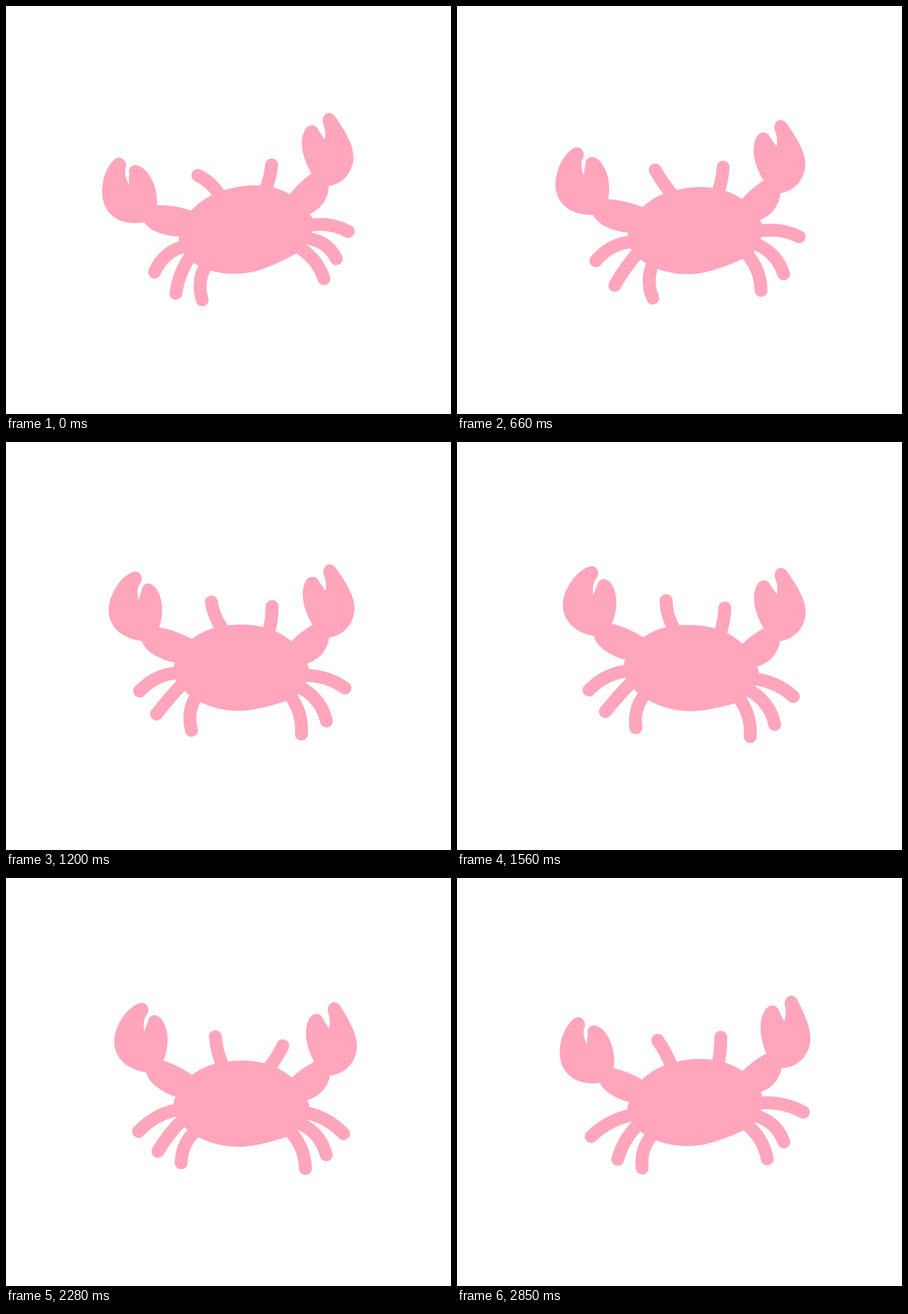
Recreate the animation shown at these times as an HTML page with a canvas. Size 759 by 697 pixels, loop 2.88 s.

```html
<!DOCTYPE html>
<html lang="en">
<head>
<meta charset="utf-8">
<title>Crab</title>
<style>
  html, body { margin: 0; height: 100%; overflow: hidden; background: #fff; }
  canvas { display: block; }
</style>
</head>
<body>
<canvas id="stage" width="759" height="697"></canvas>
<script>
const ctx = document.getElementById('stage').getContext('2d');
const LOOP = 2880, STEP = 30;
const RAD = Math.PI / 180;

// Bézier curve of any degree, used as the easing of one value over the loop.
function ease(points, t) {
  const s = t / (LOOP - STEP);
  let p = points;
  while (p.length > 1) p = p.slice(1).map((v, i) => p[i] + (v - p[i]) * s);
  return p[0];
}

// The body swings about one pivot and carries all the joints.
const pivot = [384, 347];
const tilt = t => -6.8 * RAD * (1 - Math.cos(Math.PI * (t - 1740) / 1800));
const body = new Path2D('M285 376Q295 350 318 333C340 318 365 312 397 312.5C422 313 443 318 461 327' +
  'Q484 339 498 358Q509 374 515 394Q513 414 500 433Q488 442 473 447Q430 459 398 460' +
  'Q357 459 326 441Q305 429 293 412Q284 398 283 388Z');

function onBody([x, y], t) {
  const c = Math.cos(tilt(t)), s = Math.sin(tilt(t));
  const dx = x - pivot[0], dy = y - pivot[1];
  return [pivot[0] + dx * c - dy * s, pivot[1] + dx * s + dy * c];
}

// A bone turns about its joint: swing in degrees, reach in pixels.
function bone({ joint, swing, reach }, t) {
  const [x, y] = onBody(joint, t);
  const angle = ease(swing, t) * RAD, length = ease(reach, t);
  const dx = length * Math.cos(angle), dy = length * Math.sin(angle);
  return { x, y, dx, dy, angle, length };
}

// Fills a path after turning it about `from` and moving that point to `to`.
function place(path, from, to, angle, scale = 1) {
  ctx.save();
  ctx.translate(...to);
  ctx.rotate(angle);
  ctx.scale(scale, scale);
  ctx.translate(-from[0], -from[1]);
  ctx.fill(path);
  ctx.restore();
}

// Legs and antennae are round strokes with a sideways bend.
function drawLimb(limb, t) {
  const { x, y, dx, dy, length } = bone(limb, t);
  const k = ease(limb.bend, t) / length;
  ctx.beginPath();
  ctx.moveTo(x, y);
  ctx.quadraticCurveTo(x + dx / 2 - dy * k, y + dy / 2 + dx * k, x + dx, y + dy);
  ctx.stroke();
}

// An upper arm follows its bone, the claw turns at the elbow.
function drawArm(arm, t) {
  const { x, y, dx, dy, angle, length } = bone(arm, t);
  const rx = arm.elbow[0] - arm.joint[0], ry = arm.elbow[1] - arm.joint[1];
  place(arm.upper, arm.joint, [x, y], angle - Math.atan2(ry, rx), length / Math.hypot(rx, ry));
  place(arm.claw, arm.elbow, [x + dx, y + dy], ease(arm.turn, t) * RAD);
}

const limbs = [
  // left legs
  { joint: [300, 390], swing: [142, 172, 147, 154], reach: [75, 88], bend: [20, 14] },
  { joint: [300, 407], swing: [112, 137, 136, 121], reach: [71], bend: [9, -6, 10] },
  { joint: [325, 425], swing: [99, 73, 138, 110], reach: [66], bend: [16] },
  // right legs
  { joint: [500, 405], swing: [7, -12, 60, 10], reach: [74, 84], bend: [-14] },
  { joint: [503, 428], swing: [37, 58, 61, 45], reach: [56, 75, 66, 61], bend: [-14] },
  { joint: [478, 435], swing: [50, 84, 74, 58], reach: [72], bend: [-14] },
  // antennae
  { joint: [370, 318], swing: [222, 237, 281, 242], reach: [49], bend: [7, -18, 3] },
  { joint: [449, 328], swing: [-76, -81, -60, -150, 10, -84], reach: [43, 46], bend: [3] }
];

const arms = [
  {
    joint: [310, 355], elbow: [247, 318],
    swing: [196, 196, 225, 210], reach: [71, 76, 66], turn: [-22, -14, 24, -19],
    upper: new Path2D('M345 345L318 333Q292 316 263 309L240 300L232 328Q234 343 252 356Q268 367 287 372L330 385Z'),
    claw: new Path2D('M263 310C269 298 272 280 271 268C270 252 263 236 252 233C245 232 240 236 239 243' +
      'C236 250 233 255 232 261C230 251 231 240 236 233C243 227 241 213 231 211' +
      'C222 210 206 220 194 237C183 253 179 268 180 281C181 300 196 323 232 330L250 325Z')
  },
  {
    joint: [490, 372], elbow: [537, 330],
    swing: [-50, -46, -37, -42.5], reach: [65, 62, 63.5], turn: [0, 0, -4, 8],
    upper: new Path2D('M470 365L485 347Q500 332 523 319L540 318L551 341Q549 358 535 372Q526 380 511 385L490 400Z'),
    claw: new Path2D('M523 319C514 303 507 285 507 268C507 254 512 240 520 238C527 235 533 240 535 245' +
      'C539 252 543 256 546 261C548 252 547 243 543 233C541 225 545 217 552 216' +
      'C558 216 562 219 565 224C580 246 595 270 595 291C595 315 578 338 551 341L530 340Z')
  }
];

function draw() {
  const t = performance.now() % LOOP;
  ctx.fillStyle = '#fff';
  ctx.fillRect(0, 0, 759, 697);
  ctx.fillStyle = ctx.strokeStyle = '#ffa6bc';
  ctx.lineCap = 'round';
  ctx.lineWidth = 22;
  for (const limb of limbs) drawLimb(limb, t);
  for (const arm of arms) drawArm(arm, t);
  place(body, pivot, pivot, tilt(t));
  requestAnimationFrame(draw);
}
draw();
</script>
</body>
</html>
```
